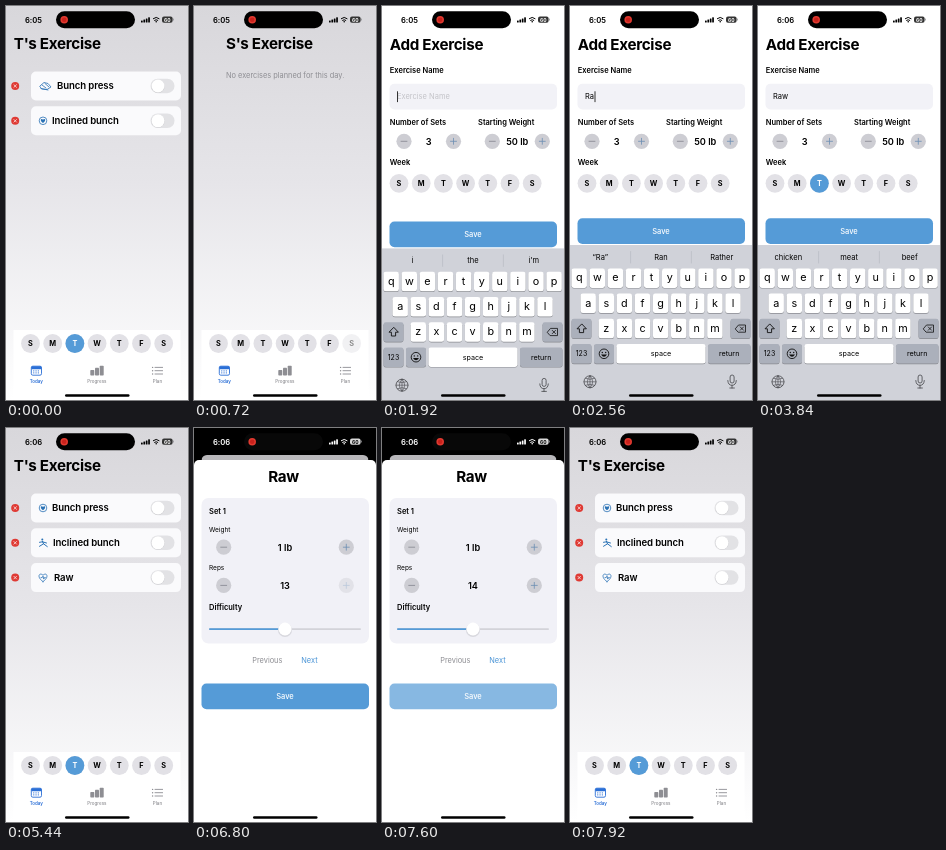
Recreate the animation shown at these times as an HTML page. Size 182x394 px, loop 8000 ms.

```html
<!DOCTYPE html>
<html lang="en">
<head>
<meta charset="utf-8">
<title>Exercise planner</title>
<style>
html, body { margin: 0; width: 100%; height: 100%; overflow: hidden; background: #fff; }
svg { display: block; width: 100vw; height: 100vh; font-family: Inter, Roboto, sans-serif; }
</style>
</head>
<body>
<svg id="stage" viewBox="0 0 182 394" preserveAspectRatio="none"></svg>
<script>
const stage = document.getElementById('stage');
const LOOP = 8000, STEP = 80;
const BLUE = '#559bd7', GRAY = '#8e8e93', DAY = '#e2e1e6';

// Drawing helpers
const rect = (x, y, w, h, fill, r = 0, more = '') =>
  `<rect x="${x}" y="${y}" width="${w}" height="${h}" rx="${r}" fill="${fill}" ${more}/>`;
const circle = (x, y, r, fill, more = '') =>
  `<circle cx="${x}" cy="${y}" r="${r}" fill="${fill}" ${more}/>`;
const line = (d, color, width = 1, more = '') =>
  `<path d="${d}" fill="none" stroke="${color}" stroke-width="${width}" stroke-linecap="round" stroke-linejoin="round" ${more}/>`;
const group = (content, transform, more = '') => `<g transform="${transform}" ${more}>${content}</g>`;
const text = (s, x, y, size, { weight = 400, fill = '#000', anchor = 'start', spacing = 0 } = {}) =>
  `<text x="${x}" y="${y}" font-size="${size}" font-weight="${weight}" fill="${fill}" text-anchor="${anchor}" letter-spacing="${spacing}" xml:space="preserve">${s}</text>`;
const centered = (s, x, y, size, weight = 400, fill = '#000') =>
  text(s, x, y, size, { weight, fill, anchor: 'middle' });
const title = (s, x, y, anchor = 'start') => text(s, x, y, 15.2, { weight: 700, spacing: -0.3, anchor });
const label = (s, x, y) => text(s, x, y, 7.5, { weight: 600 });
const ramp = (t, from, to) => Math.min(1, Math.max(0, (t - from) / (to - from)));

function statusBar(clock, dark) {
  const ink = dark ? '#fff' : '#000', paper = dark ? '#000' : '#fff';
  const bars = [0, 1, 2, 3].map(i => rect(135 + i * 2.4, 14.6 - i * 1.1, 1.7, 1.9 + i * 1.1, ink, 0.5)).join('');
  return text(clock, 19, 16.6, 7.7, { weight: 600 , fill: ink, spacing: -0.1 }) +
    rect(50, 5.2, 79, 17, dark ? '#080808' : '#000', 8.5) +
    circle(58.2, 13.7, 3.8, '#e03a30') + circle(58.2, 13.7, 2.3, '#c9211c') + bars +
    line('M147.3 12.6Q150.2 10 153.1 12.6M148.6 14.3Q150.2 13 151.8 14.3', ink, 1) + circle(150.2, 15.8, 0.8, ink) +
    rect(156, 10.4, 10.6, 6.4, dark ? '#d8d8d8' : '#333', 2) + rect(167, 12.4, 0.8, 2.2, GRAY, 0.4) +
    centered('60', 161.3, 15.6, 5, 700, paper);
}

const homeBar = () => rect(59, 388.2, 64.5, 2.5, '#000', 1.25);

function days(x, y, selected, amount = 1, pressed = -1) {
  return [...'SMTWTFS'].map((letter, i) => {
    const cx = x + i * 22.2;
    const fill = i === selected ? circle(cx, y, 9.4, BLUE, `opacity="${amount}"`) : '';
    const face = circle(cx, y, 9.4, DAY) + fill +
      centered(letter, cx, y + 2.6, 7.3, 700, i === selected && amount > 0.5 ? '#fff' : '#000');
    return `<g opacity="${i === pressed ? 0.45 : 1}">${face}</g>`;
  }).join('');
}

function tabBar(active) {
  const color = i => i === active ? '#2b6fd6' : GRAY;
  const dots = [0, 1, 2, 3, 4, 5].map(i =>
    rect(27.2 + i % 3 * 2.3, 364.4 + (i / 3 | 0) * 2, 1.1, 1, color(0))).join('');
  const list = [0, 1, 2].map(i =>
    circle(146.6, 361.4 + i * 3.3, 0.7, color(2)) + line(`M149 ${361.4 + i * 3.3}H156.6`, color(2), 0.9)).join('');
  return rect(25.3, 360.2, 10.2, 9, 'none', 1.5, `stroke="${color(0)}" stroke-width=".9"`) +
    rect(25.3, 360.2, 10.2, 3, color(0), 1) + dots +
    rect(84.3, 364, 4, 5.4, color(1), 0.7) + rect(89, 361.8, 4, 7.6, color(1), 0.7) +
    rect(93.7, 359.8, 4, 9.6, color(1), 0.7) + list +
    ['Today', 'Progress', 'Plan'].map((s, i) =>
      centered(s, 30.3 + i * 60.6, 377, 4.5, i === active ? 600 : 500, color(i))).join('');
}

const icons = {
  hands: line('M-5 0L-1-3.5 3-2.5 6 1 2 3.5-3 3ZM-3-1L1 2M0-2.5L4 1M-4 2.5L3 4', '#2a72b5', 0.8),
  target: circle(0, 0, 3.8, 'none', 'stroke="#2a72b5" stroke-width=".8"') +
    '<path d="M0 2.3C-4-.3-1.5-3 0-1.1 1.5-3 4-.3 0 2.3Z" fill="#2a72b5"/>',
  figure: circle(-1.2, -3.2, 1, '#2a72b5') + line('M-1-1.5L0 1 3.8 3.8M0 1L-4 3.5M-1-1L3 .2M-4-.5L-1-1', '#2a72b5', 1),
  heart: line('M0 4C-7-.5-3.5-6 0-2.3 3.5-6 7-.5 0 4ZM-2 0H-.8L0-1.5 .8 1.5 1.4 0H2.4', '#2a72b5', 0.8)
};

function exerciseRow(y, name, icon, iconX = 37, textX = 46) {
  return circle(9.2, y, 4, '#df3a34') +
    line(`M7.9 ${y - 1.3}l2.6 2.6M10.5 ${y - 1.3}l-2.6 2.6`, '#fff', 0.7) +
    rect(25, y - 14.5, 150, 29, '#fafafc', 5) + group(icons[icon], `translate(${iconX} ${y})`) +
    text(name, textX, y + 3.3, 9.6, { weight: 600, spacing: -0.1 }) +
    rect(144.5, y - 7.3, 24, 14.5, '#e2e2e5', 7.25) +
    circle(152, y + 0.4, 6.6, '#c9c9cd') + circle(152, y, 6.5, '#fff');
}

function today(t) {
  const empty = t >= 320 && t < 1120, later = t > 4000;
  const backdrop = `<defs><linearGradient id="wall" x2="0" y2="1">
    <stop offset="0" stop-color="#d8d7db"/><stop offset=".45" stop-color="#e6e5e9"/>
    <stop offset=".9" stop-color="#fafafb"/><stop offset="1" stop-color="#fff"/></linearGradient></defs>` +
    rect(0, 0, 182, 394, 'url(#wall)') + rect(7.5, 324, 167, 70, '#fff');
  let content, selected = 2, amount = 1, pressed = -1;
  if (empty) {
    const saturday = t >= 720, start = saturday ? 720 : 320;
    selected = saturday ? 6 : 5;
    amount = ramp(t, start, start + 240);
    pressed = t === start ? selected : -1;
    content = title((saturday ? 'S' : 'F') + "'s Exercise", 32, 42.5) +
      text('No exercises planned for this day.', 32, 71.8, 7.4, { fill: GRAY });
  } else {
    content = title("T's Exercise", 7.8, 42.5) + (later
      ? exerciseRow(80, 'Bunch press', 'target') + exerciseRow(114.8, 'Inclined bunch', 'figure', 37.5, 47) +
        exerciseRow(149.6, 'Raw', 'heart', 37, 48)
      : exerciseRow(80, 'Bunch press', 'hands', 39, 51) + exerciseRow(114.8, 'Inclined bunch', 'target'));
  }
  return backdrop + content + days(24.5, 337.5, selected, amount, pressed) + tabBar(0);
}

function plan() {
  return rect(0, 0, 182, 394, '#fff') + title('Plan', 7.8, 42.5) +
    line('M165 38H173M169 34V42', BLUE, 1.2) +
    ['Bunch press', 'Inclined bunch'].map((s, i) =>
      rect(7.5, 65.5 + i * 34.8, 167.5, 29, '#f2f2f7', 5) +
      text(s, 16, 83.3 + i * 34.8, 9.6, { weight: 600, spacing: -0.1 })).join('') + tabBar(2);
}

function stepper(minusX, plusX, y, value, pressed = false) {
  return circle(minusX, y, 7.6, '#cdcdd3') + line(`M${minusX - 3} ${y}h6`, '#85868e', 0.8) +
    centered(value, (minusX + plusX) / 2, y + 3.4, 9.2, 600) +
    `<g opacity="${pressed ? 0.4 : 1}">` + circle(plusX, y, 7.6, '#cdcdd3') +
    line(`M${plusX - 3} ${y}h6M${plusX} ${y - 3}v6`, '#6d8fb3', 0.8) + '</g>';
}

const saveButton = (y, opacity = 1) =>
  `<g opacity="${opacity}">` + rect(7.5, y, 167.5, 25.7, BLUE, 5) + centered('Save', 91, y + 15.6, 7.5, 500, '#fff') + '</g>';

function keyboard(words) {
  const key = (x, y, w, fill = '#fff') =>
    rect(x, y + 0.7, w, 19.5, '#898b91', 2.3) + rect(x, y, w, 19.5, fill, 2.3);
  const letters = ['qwertyuiop', 'asdfghjkl', 'zxcvbnm'].map((row, r) => [...row].map((c, i) => {
    const x = [9.2, 18.2, 36.3][r] + i * 18.1, y = 262.4 + r * 25.2;
    return key(x - 7.7, y, 15.4) + centered(c, x, y + 12.9, 10.8);
  }).join('')).join('');
  const dim = '#abb0bb', low = 338;
  return rect(0, 239, 182, 160, '#d0d2d9') +
    words.map((s, i) => centered(s, 30.3 + i * 60.7, 253.6, 7.5)).join('') +
    line('M60.6 245.5V257M121.4 245.5V257', '#b4b7bf', 0.6) + letters +
    key(1.5, 312.8, 20, dim) + line('M11.5 318.2L7 322.8H9.4V326.6H13.6V322.8H16Z', '#111', 0.9) +
    key(160.5, 312.8, 20, dim) + line('M165.5 322.6L168.5 319H175.5V326.2H168.5ZM170.3 321l3.2 3.2M173.5 321l-3.2 3.2', '#111', 0.8) +
    key(1.5, low, 20, dim) + centered('123', 11.5, 350.4, 7) +
    key(24, low, 20, dim) + circle(34, 347.8, 4.8, 'none', 'stroke="#111" stroke-width=".9"') +
    circle(32.3, 346.5, 0.7, '#111') + circle(35.7, 346.5, 0.7, '#111') + '<path d="M31 348.5H37Q34 353 31 348.5" fill="#111"/>' +
    key(46.5, low, 89, '#fff') + centered('space', 91, 350.2, 7.2) +
    key(138, low, 42.5, dim) + centered('return', 159.2, 350.2, 7.2) +
    circle(20, 375.8, 6, 'none', 'stroke="#45464a" stroke-width=".8"') +
    line('M14 375.8H26M20 369.8V381.8M15.5 372.3Q20 374.5 24.5 372.3M15.5 379.3Q20 377.1 24.5 379.3M20 369.8Q14.5 375.8 20 381.8Q25.5 375.8 20 369.8', '#45464a', 0.6) +
    rect(160.1, 369, 4, 8, 'none', 2, 'stroke="#45464a" stroke-width=".8"') +
    line('M157.8 374.5Q158 379.3 162 379.3T166.3 374.5M162 379.3V382M159.8 382H164.4', '#45464a', 0.8);
}

function suggestions(t) {
  if (t < 2240) return ['i', 'the', "i'm"];
  if (t < 2480) return ['“R”', 'Right', 'Really'];
  if (t < 2720) return ['“Ra”', 'Ran', 'Rather'];
  if (t < 3040) return ['“Raw”', 'Rawr', 'Raws'];
  return ['chicken', 'meat', 'beef'];
}

function addExercise(t) {
  const typed = 'Raw'.slice(0, t < 2240 ? 0 : t < 2480 ? 1 : t < 2720 ? 2 : 3);
  const typing = t >= 1920;
  const lift = typing ? 3.4 * (1 - ramp(t, 1920, 2080)) : 111;
  const caret = typing && t < 3840 ? rect(15 + [0, 5.2, 9.5, 15.6][typed.length], 85.3, 1, 10.8, '#333') : '';
  const dip = t >= 4640 && t < 4960 ? 0.65 + 0.35 * ramp(t, 4640, 4960) : 1;
  return rect(0, 0, 182, 394, '#fff') + title('Add Exercise', 7.8, 43.5) +
    label('Exercise Name', 7.8, 67.3) + rect(7.5, 77.7, 167.5, 25.8, '#f2f2f7', 5) +
    text(typed || 'Exercise Name', 15, 93.3, 7.5, { fill: typed ? '#000' : '#c3c3c8' }) + caret +
    label('Number of Sets', 7.8, 118.8) + label('Starting Weight', 96, 118.8) +
    stepper(22, 71.5, 135.3, '3') + stepper(110.3, 160.3, 135.3, '50 lb') +
    label('Week', 7.8, 158.6) +
    days(17, 177.3, t >= 3440 ? 2 : -1, t < 3520 ? 0.5 : 1) +
    saveButton(212.2 + lift, dip) +
    (typing ? group(keyboard(suggestions(t)), `translate(0 ${lift})`) : tabBar(2));
}

function workoutSheet(t) {
  const weight = t < 6320 ? 0 : 1;
  const reps = t < 6800 ? 12 : t < 7120 ? 13 : 14;
  const pressed = t === 6800 || t === 7120;
  return rect(0, 32, 182, 380, '#fff', 5) + title('Raw', 89.5, 54, 'middle') +
    rect(7.5, 70, 167.5, 145.5, '#f1f1f7', 7) + label('Set 1', 15, 85.6) +
    text('Weight', 15, 104, 6.5) + stepper(29.7, 152.3, 119.2, weight + ' lb') +
    text('Reps', 15, 142.4, 6.5) + stepper(29.7, 152.3, 157.4, reps, pressed) +
    label('Difficulty', 15, 182.2) +
    rect(15, 200.2, 152, 1.8, '#d3d3d9', 0.9) + rect(15, 200.2, 76, 1.8, BLUE, 0.9) +
    circle(91, 202, 7, '#d8d8de') + circle(91, 201, 6.5, '#fff') +
    text('Previous', 58.2, 234.6, 7.4, { fill: GRAY }) + text('Next', 107.3, 234.6, 7.4, { fill: '#4a94d6' }) +
    saveButton(255.5, t >= 7520 && t < 7680 ? 0.7 : 1);
}

function sheetProgress(t) {
  if (t < 6080 || t >= 7920) return 0;
  if (t < 6160) return 0.6;
  return 1 - ramp(t, 7600, 7920) ** 0.8;
}

function draw(t) {
  const open = sheetProgress(t);
  let scene;
  if (t >= 1120 && t < 1520) scene = plan();
  else if (t >= 1520 && t < 5200) scene = addExercise(t);
  else scene = today(t);
  if (t >= 5200 && t < 5440)
    scene += group(keyboard(suggestions(t)), `translate(0 ${155 * ramp(t, 5120, 5440)})`);
  if (open) {
    const dimmed = scene + rect(0, 0, 182, 394, '#000', 0, `opacity="${0.15 * open}"`);
    scene = rect(0, 0, 182, 394, '#000') +
      group(dimmed, `translate(${7.5 * open} ${27 * open}) scale(${1 - 0.0824 * open})`, 'clip-path="inset(0 round 6px)"') +
      group(workoutSheet(t), `translate(0 ${362 * (1 - open)})`);
  }
  stage.innerHTML = scene + statusBar(t < 3040 ? '6:05' : '6:06', open > 0.5) + homeBar();
}

let shown = -1;
const began = performance.now();
function tick() {
  const t = Math.floor((performance.now() - began) % LOOP / STEP) * STEP;
  if (t !== shown) draw(shown = t);
  requestAnimationFrame(tick);
}
tick();
</script>
</body>
</html>
```
